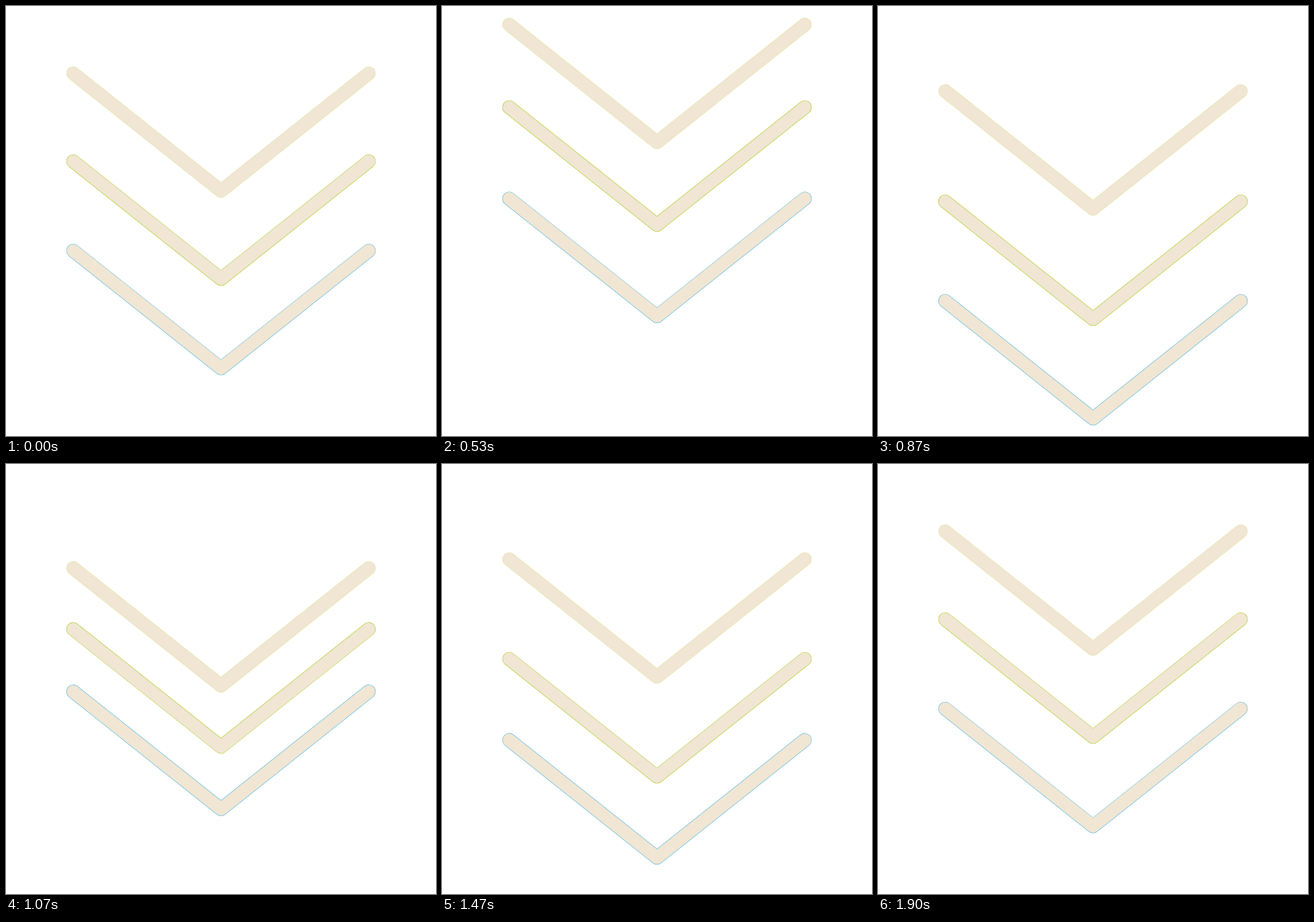
Animation, 640 px wide and 640 px high, one loop 2 s. Source, as an HTML page with a canvas:

```html
<!DOCTYPE html>
<html lang="en">
<head>
<meta charset="utf-8">
<title>Bouncing chevrons</title>
<style>
html, body { margin: 0; width: 100%; height: 100%; overflow: hidden; background: #fff; }
canvas { display: block; width: 640px; height: 640px; }
</style>
</head>
<body>
<canvas id="stage" width="640" height="640"></canvas>
<script>
const ctx = document.getElementById('stage').getContext('2d');
const LOOP = 2000, FPS = 30;

// Shared bounce: [tick, vertical offset], eased between neighbours
const KEYS = [[0, 0], [15, -81.7], [26, 74.8], [34, -45.6], [42, 59], [49, 0]];

// The lowest chevron leads, the others follow two ticks apart
const CHEVRONS = [
  { y: 100.2, delay: 4, edge: '#e7e7a8' },
  { y: 231.2, delay: 2, edge: '#a9c916' },
  { y: 364.2, delay: 0, edge: '#4db4e6' },
];

// cubic-bezier(.3, 0, .7, 1), solved by bisection
function ease(x) {
  const bezier = (t, a, b) => 3 * t * (1 - t) * (a * (1 - t) + b * t) + t ** 3;
  let lo = 0, hi = 1;
  for (let i = 0; i < 20; i++) {
    const mid = (lo + hi) / 2;
    if (bezier(mid, 0.3, 0.7) < x) lo = mid; else hi = mid;
  }
  return bezier(hi, 0, 1);
}

function offset(tick) {
  if (tick <= 0) return 0;
  const i = KEYS.findIndex(([t]) => t >= tick);
  if (i < 0) return 0;
  const [t0, y0] = KEYS[i - 1], [t1, y1] = KEYS[i];
  return y0 + (y1 - y0) * ease((tick - t0) / (t1 - t0));
}

function chevron(y, edge) {
  ctx.beginPath();
  ctx.moveTo(100, y);
  ctx.lineTo(320, y + 175);
  ctx.lineTo(540, y);
  for (const [color, width] of [[edge, 20.6], ['#f0e6d3', 19.4]]) {
    ctx.strokeStyle = color;
    ctx.lineWidth = width;
    ctx.stroke();
  }
}

function draw(ms) {
  // Whole ticks, with switch times rounded to 10 ms
  const tick = Math.floor((ms % LOOP + 3.4) * FPS / 1000);
  ctx.fillStyle = '#fff';
  ctx.fillRect(0, 0, 640, 640);
  ctx.lineCap = ctx.lineJoin = 'round';
  for (const { y, delay, edge } of CHEVRONS) chevron(y + offset(tick - delay), edge);
}

const start = performance.now();
function loop() {
  draw(performance.now() - start);
  requestAnimationFrame(loop);
}
loop();
</script>
</body>
</html>
```
